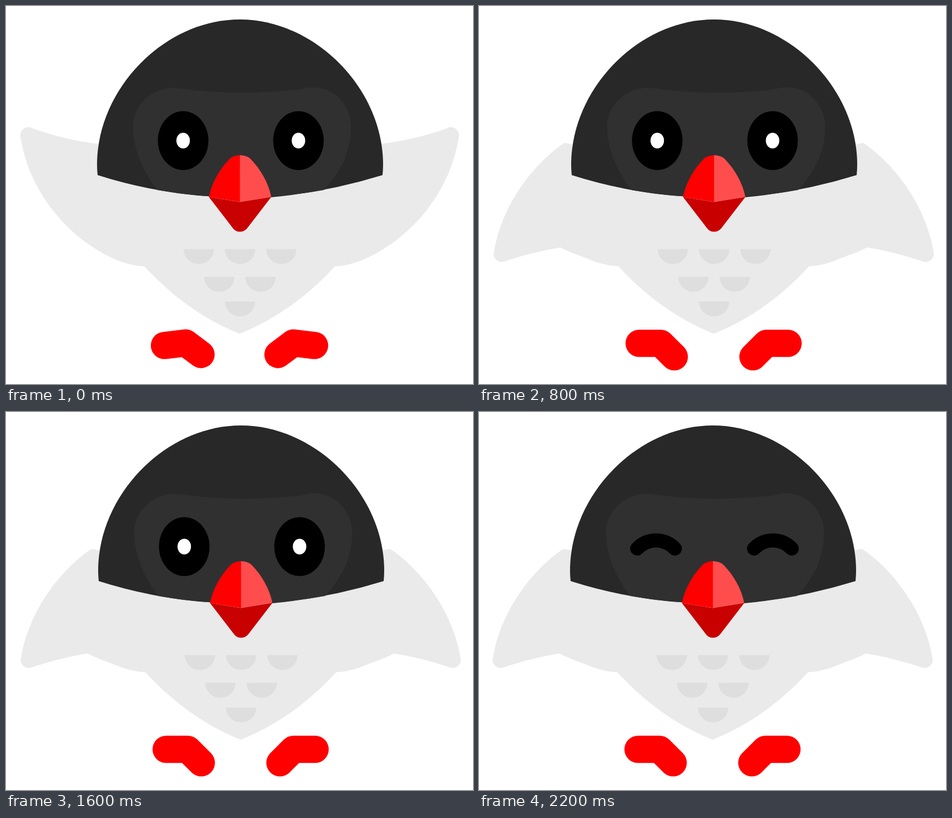
Write an HTML page that moves like this. It is 831 px wide and 674 px high and loops after 2400 ms.

```html
<!DOCTYPE html>
<html lang="en">
<meta charset="utf-8">
<title>Finch</title>
<style>
html, body { margin: 0; width: 100%; height: 100%; overflow: hidden; background: #fff; }
svg { display: block; }
</style>
<svg width="831" height="674" viewBox="0 0 831 674">
  <g id="bird">
    <g fill="#eaeaea">
      <path id="side"/>
      <use href="#side" transform="translate(831.5) scale(-1 1)"/>
    </g>
    <path id="scales" fill="#dedede"/>
    <path fill="#282828" d="M163 301.5Q162 292 162 283C162 147 282.5 24 416 24C549.5 24 671 147 671 283Q671 292 670 301.5Q573 331.5 472 341H416Q287 341 163 301.5Z"/>
    <path fill="#303030" d="M269 328C240 290 226 250 226 215C226 177 260 146 297 146C304 146 311 147 318 148Q416 161 520 149C530 147 538 145 546 145C585 145 614 178 614 215C614 255 600 290 566 328Q417 355 269 328Z"/>
    <g id="open">
      <g id="eye">
        <ellipse cx="315.2" cy="240" rx="45" ry="52.5"/>
        <ellipse cx="315.2" cy="240" rx="12" ry="14" fill="#fff"/>
      </g>
      <use href="#eye" x="205.2"/>
    </g>
    <path id="closed" fill="none" stroke="#000" stroke-width="25" stroke-linecap="round" d="M281.5 243.5A46 46 0 0 1 348.5 243.5M489.5 243.5A46 46 0 0 1 556.5 243.5"/>
    <path fill="#f00" d="M417 266Q405 266 398 272.5C380 291 366 315 361 340.5L417 349.5Z"/>
    <path fill="#ff4d4d" d="M416.2 266Q428 266 435 272.5C453 291 467 315 472 340.5L416.2 349.5Z"/>
    <path fill="#c80000" d="M361 340.5L416.2 349.5L472 340.5L429 396.5Q424 402.5 416.2 402.5Q408.5 402.5 404 396.5Z"/>
    <g fill="none" stroke="#f00" stroke-width="48.6" stroke-linecap="round" stroke-linejoin="round">
      <path id="foot"/>
      <use href="#foot" transform="translate(831) scale(-1 1)"/>
    </g>
  </g>
</svg>
<script>
const $ = id => document.getElementById(id);
const belly = 'Q322 547 416 584.5Z';
const wings = {
  up: 'M416 250L165 246C125 241 85 232 47 218A14.5 14.5 0 0 0 26 235C39 315 85 378 140 420C178 447 212 463 246 464' + belly,
  down: 'M416 250L165 247L150 244C92 283 38 358 25 437A14.5 14.5 0 0 0 45 455C78 444 110 436 143 430.5C165 442 182 446 205 456Q226 463 246 464' + belly
};
const feet = {
  bent: 'M282 605.3L319.5 600.8L347 621.4',
  flat: 'M283 601.5H321.5L345.5 625.5'
};

// wing, eyes open, feet, x shift, y shift
const rest = ['up', 1, 'bent', 0, 0];
const dip = ['up', 1, 'bent', 0, 2];
const rise = ['up', 1, 'bent', 0, 1];
const smileUp = ['up', 0, 'flat', 0, 0];
const smileDown = ['down', 0, 'flat', 0, 0];
const sway = ['down', 1, 'flat', 2, 0];
const poses = [rest, dip, rise, smileDown, sway, dip, smileUp, rest, sway, smileDown, smileUp, smileDown];
const step = 200;

$('scales').setAttribute('d',
  [[343, 433.5], [416.5, 433.5], [490, 433.5], [379.5, 483], [453, 483], [416.5, 527]]
    .map(([x, y]) => `M${x - 27} ${y}h54a27 26.5 0 0 1 -54 0Z`).join(''));

function draw(now) {
  const [wing, open, foot, x, y] = poses[Math.floor(now / step) % poses.length];
  $('side').setAttribute('d', wings[wing]);
  $('foot').setAttribute('d', feet[foot]);
  $('open').style.display = open ? '' : 'none';
  $('closed').style.display = open ? 'none' : '';
  $('bird').setAttribute('transform', `translate(${x} ${y})`);
}

const start = performance.now();
function tick() {
  draw(performance.now() - start);
  requestAnimationFrame(tick);
}
tick();
</script>
</html>
```
